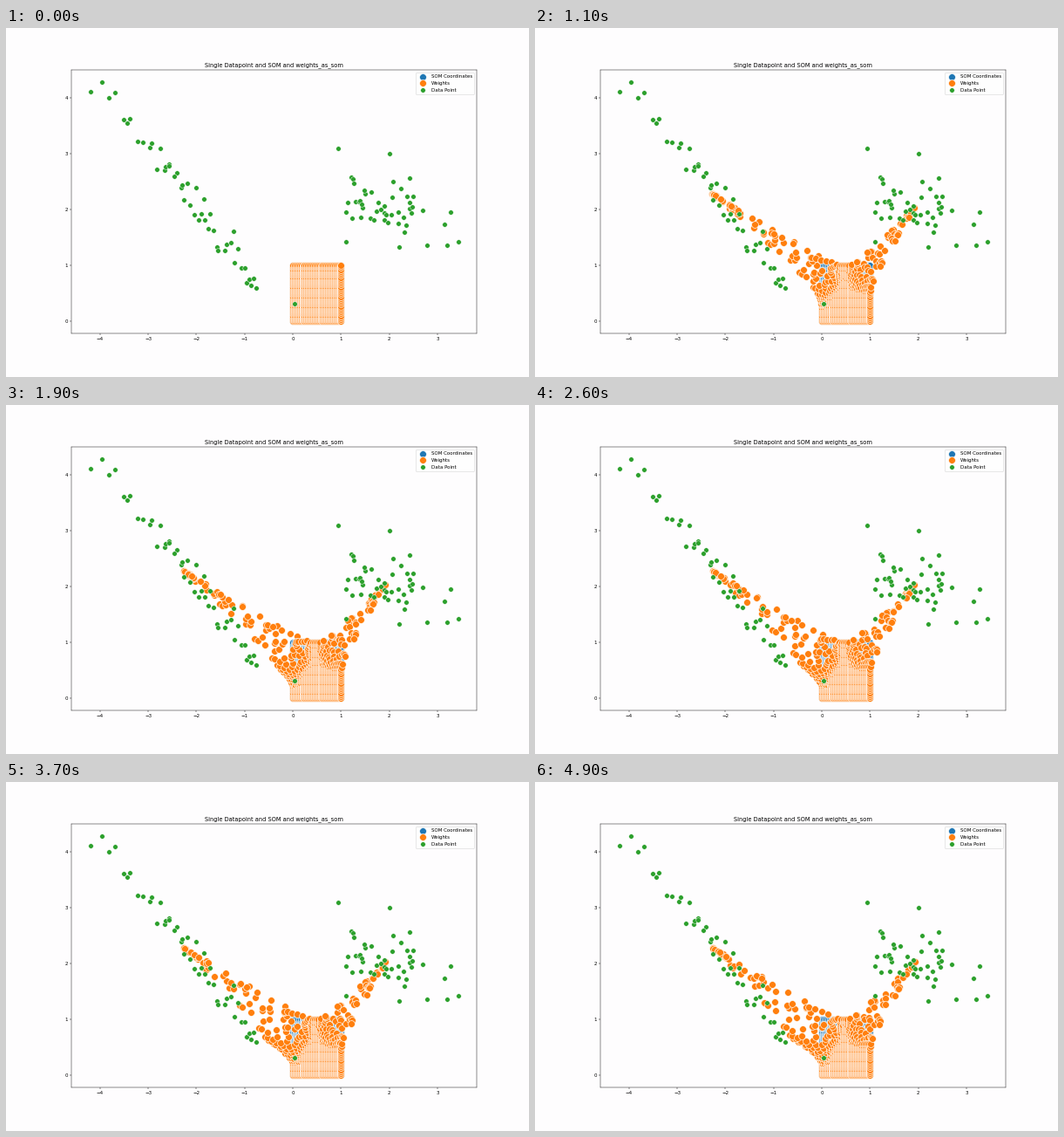
Animation of 600x400 px, one loop 5000 ms. Source, as a matplotlib script:

```python
import numpy as np
import matplotlib.pyplot as plt
from matplotlib.animation import FuncAnimation

FRAMES, INTERVAL = 50, 100
GRID = 30
BLUE, ORANGE, GREEN = "#1f77b4", "#ff7f0e", "#2ca02c"
PAPER = "#fefdfe"

rng = np.random.default_rng(4)


def cluster(count, x_quantiles, trend, spread, y_range):
    """Random points whose x follows the quantiles and y scatters about a line."""
    x = np.interp(np.linspace(0, 1, count),
                  np.linspace(0, 1, len(x_quantiles)), x_quantiles)
    x = x + rng.normal(0, 0.03, count)
    slope, intercept = trend
    y = slope * x + intercept + rng.normal(0, spread, count)
    return np.column_stack([x, np.clip(y, *y_range)])


left_cluster = cluster(47, (-3.8, -2.9, -2.45, -2.0, -1.6, -1.1, -0.75),
                       (-1.08, -0.10), 0.16, (0.57, 4.1))
right_cluster = cluster(42, (1.07, 1.3, 1.5, 1.85, 2.05, 2.3, 2.5),
                        (-0.30, 2.55), 0.30, (1.34, 2.77))
outliers = [(-4.20, 4.11), (-3.96, 4.29), (0.94, 3.10), (2.00, 3.00),
            (2.42, 2.56), (2.70, 1.99), (3.27, 1.96), (3.14, 1.74),
            (2.78, 1.37), (3.20, 1.37), (3.44, 1.42)]
single_point = [(0.03, 0.31)]
data = np.vstack([left_cluster, right_cluster, outliers, single_point])

steps = np.linspace(0, 1, GRID)
nodes = np.array([(x, y) for x in steps for y in steps])


def pull(center, sigma, strength):
    """Share of the way each node has been drawn towards a target."""
    dist2 = ((nodes - center) ** 2).sum(axis=1)
    share = 1 - np.exp(-strength * np.exp(-dist2 / (2 * sigma ** 2)))
    return share[:, None]


def weights_at(frame):
    late = np.clip((frame - 10) / 39, 0, 1) ** 0.8
    wobble = np.sin(frame * 1.7)
    sway = np.sin(frame * 0.9 + 1)

    left_target = np.array([-2.27 + 0.01 * wobble, 2.29 - 0.01 * wobble])
    right_target = np.array([1.92 + 0.01 * sway, 2.03 + 0.01 * wobble])
    low_target = np.array([-0.88, 0.78])

    left = pull((0, 0.84 + 0.01 * sway), 0.095, 4.5 * frame)
    right = pull((0.93, 0.93 + 0.01 * wobble), 0.09, 3.4 * frame)
    low = pull((0, 0.45), 0.08, 1.2 * late) * (1 - left)

    return (nodes + left * (left_target - nodes)
            + right * (right_target - nodes)
            + low * (low_target - nodes))


plt.rcParams["font.family"] = "DejaVu Sans"
fig, ax = plt.subplots(figsize=(15, 10), dpi=40, facecolor=PAPER)
fig.subplots_adjust(left=0.125, right=0.9, bottom=0.125, top=0.88)
ax.set_facecolor(PAPER)


def dots(points, size, color, label):
    x, y = points.T
    return ax.scatter(x, y, s=size, color=color, edgecolors="white",
                      linewidths=0.08 * np.sqrt(size), label=label)


dots(nodes, 200, BLUE, "SOM Coordinates")
weights = dots(nodes, 200, ORANGE, "Weights")
dots(data, 100, GREEN, "Data Point")

ax.set_xlim(-4.592, 3.812)
ax.set_ylim(-0.2145, 4.5045)
ax.set_xticks(range(-4, 4))
ax.set_yticks(range(5))
ax.set_title("Single Datapoint and SOM and weights_as_som", fontsize=12)
ax.legend(loc="upper right", fontsize=10)


def update(frame):
    weights.set_offsets(weights_at(frame))
    return [weights]


anim = FuncAnimation(fig, update, frames=FRAMES, interval=INTERVAL,
                     repeat=True, repeat_delay=0)
plt.show()
```
